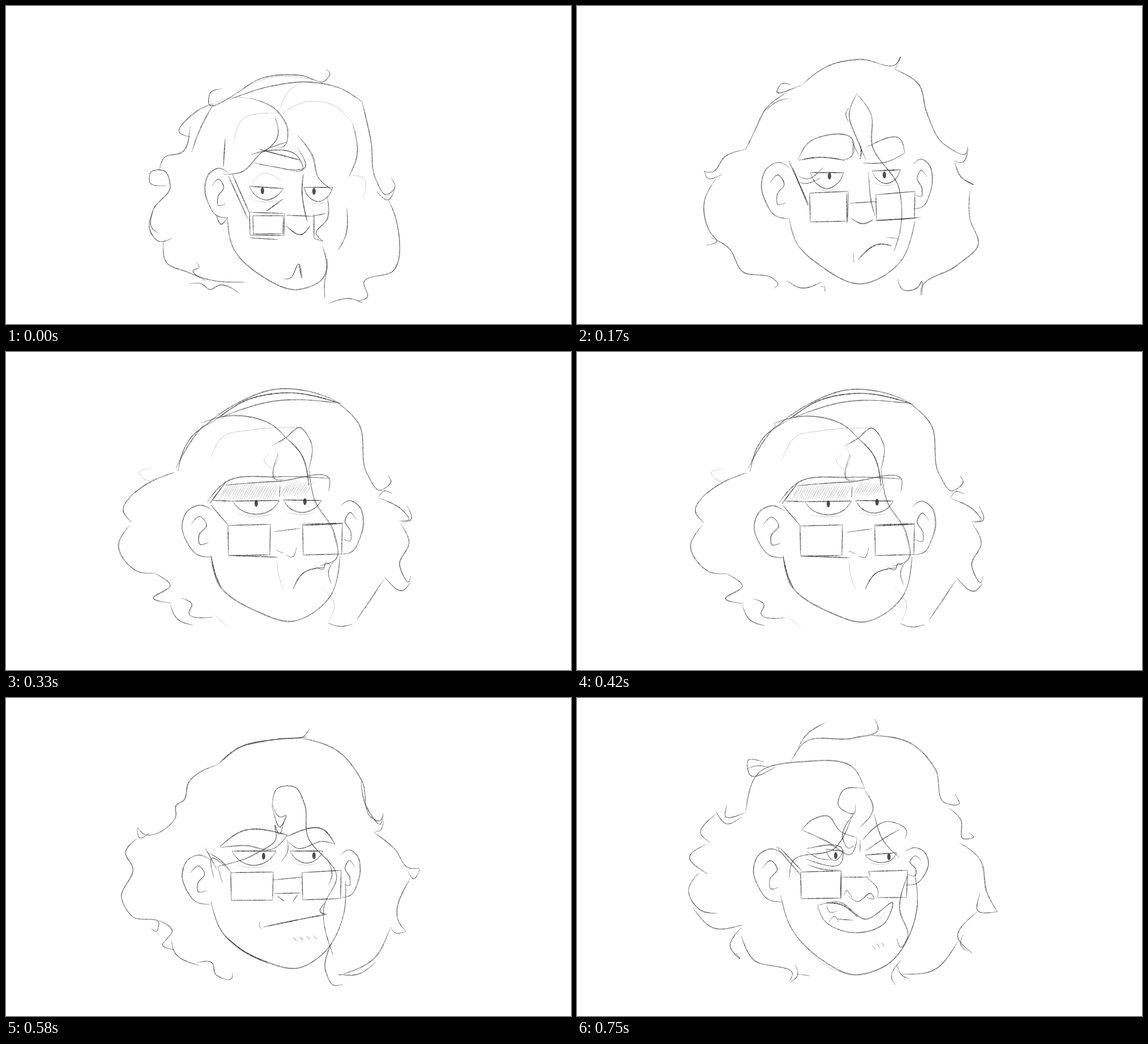
Write an HTML page with a canvas that moves like this. It is 998 by 561 pixels and loops after 870 ms.

```html
<!DOCTYPE html>
<html lang="en">
<head>
<meta charset="utf-8">
<title>Pencil head turn</title>
<style>
html, body { margin: 0; width: 100%; height: 100%; overflow: hidden; background: #fff; }
canvas { display: block; width: 998px; height: 561px; }
</style>
</head>
<body>
<canvas id="stage" width="998" height="561"></canvas>
<script>
const LOOP = 870, W = 998, H = 561;
let g, seed;

const rnd = () => (seed = (seed * 16807) % 2147483647) / 2147483647;

function pairs(v) {
  const p = [];
  for (let i = 0; i < v.length; i += 2) p.push([v[i], v[i + 1]]);
  return p;
}

// Smooth curve through a few points; tangents weighted by chord length.
function smooth(p) {
  const n = p.length - 1, out = [];
  const len = i => Math.hypot(p[i + 1][0] - p[i][0], p[i + 1][1] - p[i][1]) || 1;
  const dir = (i, j) => (p[i + 1][j] - p[i][j]) / len(i);
  const inner = (i, j) => (dir(i - 1, j) * len(i) + dir(i, j) * len(i - 1)) / (len(i - 1) + len(i));
  const tangent = (i, j) => n < 2 ? dir(0, j)
    : i === 0 ? 1.5 * dir(0, j) - inner(1, j) / 2
    : i === n ? 1.5 * dir(n - 1, j) - inner(n - 1, j) / 2 : inner(i, j);
  for (let i = 0; i < n; i++) {
    const d = len(i), steps = Math.max(2, Math.ceil(d / 2.5));
    for (let k = 0; k < steps; k++) {
      const t = k / steps, u = 1 - t;
      out.push([0, 1].map(j => u * u * (1 + 2 * t) * p[i][j] + t * t * (3 - 2 * t) * p[i + 1][j]
        + d * t * u * (u * tangent(i, j) - t * tangent(i + 1, j))));
    }
  }
  return out.concat([p[n]]);
}

function pencil(pts, width, alpha) {
  const last = pts.length - 1;
  for (let i = 0; i < last; i++) {
    const taper = Math.min(1, 0.45 + Math.min(i, last - i) * 0.09);
    g.globalAlpha = alpha * taper * (0.7 + 0.5 * rnd());
    g.lineWidth = width * (0.85 + 0.3 * rnd());
    g.beginPath();
    g.moveTo(...pts[i]);
    g.lineTo(...pts[i + 1]);
    g.stroke();
  }
}

// A loose second pass over part of a long stroke.
function retrace(pts) {
  if (pts.length < 25) return;
  const from = Math.floor(rnd() * pts.length * 0.4);
  const part = pts.slice(from, from + Math.floor(pts.length * 0.5));
  const sx = rnd() * 3 - 1.5;
  pencil(part.map(([x, y]) => [x + sx, y + 1]), 0.9, 0.35);
}

function line(...v) {
  const pts = smooth(pairs(v));
  pencil(pts, 1.15, 0.7);
  retrace(pts);
}
const faint = (...v) => pencil(smooth(pairs(v)), 0.9, 0.27);
const dark = (...v) => pencil(smooth(pairs(v)), 1.6, 0.82);

function edge(...v) {
  const p = pairs(v);
  for (let i = 1; i < p.length; i++) pencil(smooth([p[i - 1], p[i]]), 1.4, 0.76);
}

function lens(x, y, w, h, tilt) {
  edge(x, y, x + w, y - tilt, x + w - 1, y + h - tilt / 2, x + 1, y + h, x, y);
}

// x is the outer rim; a negative w mirrors the ear.
function ear(x, y, w, h) {
  const fit = (...v) => v.map((n, i) => i % 2 ? y + n * h : x + n * w);
  line(...fit(1, 0.1, 0.6, 0, 0.2, 0.1, 0, 0.42, 0.15, 0.7, 0.5, 0.95, 0.98, 1));
  line(...fit(0.3, 0.36, 0.58, 0.22, 0.8, 0.38, 0.55, 0.58, 0.58, 0.75, 0.86, 0.72));
}

function eye(x0, y0, x1, y1, depth, px, py) {
  const w = x1 - x0;
  dark(x0, y0, x1, y1);
  line(x0, y0, x0 + w * 0.17, y0 + depth * 0.65, x0 + w / 2, y0 + depth, x0 + w * 0.83, y0 + depth * 0.65, x1, y1);
  faint(x0 + w * 0.1, y0 + depth, x0 + w / 2, y0 + depth + 4, x0 + w * 0.85, y0 + depth);
  g.globalAlpha = 0.8;
  g.beginPath();
  g.ellipse(px, py, 3, 6, 0, 0, 2 * Math.PI);
  g.fill();
}

function hatch(x0, x1, top, bottom) {
  for (let x = x0; x < x1; x += 4) {
    pencil(smooth([[x + 7, top + 3 * rnd()], [x - 7, bottom - 4 * rnd()]]), 0.9, 0.4);
  }
}

function glance() {
  line(410, 153, 445, 130, 520, 122, 565, 131, 572, 119, 566, 112);
  line(395, 165, 470, 141, 535, 134, 590, 145, 629, 169);
  faint(409, 150, 480, 124, 540, 130);
  line(382, 146, 361, 153, 358, 171, 415, 149);
  line(430, 162, 480, 186, 498, 220, 490, 248, 480, 250);
  faint(366, 172, 400, 161, 430, 163);
  line(367, 172, 336, 186, 307, 224, 325, 231);
  line(328, 258, 345, 212, 366, 174);
  line(325, 212, 312, 257, 279, 268, 271, 289);
  line(284, 317, 254, 311, 256, 293, 280, 291, 290, 318, 259, 362, 258, 392, 268, 400);
  line(259, 362, 254, 395, 270, 415, 293, 410);
  line(278, 416, 283, 452, 320, 469, 360, 483, 422, 487);
  line(336, 451, 341, 461, 331, 466, 352, 484);
  line(325, 490, 345, 490, 360, 500, 378, 492, 412, 507);
  line(629, 169, 645, 240, 653, 305, 672, 333, 687, 320, 680, 303);
  line(687, 322, 675, 342, 655, 328);
  line(676, 342, 691, 385, 684, 467, 632, 488, 638, 514, 622, 520);
  line(570, 525, 608, 516, 630, 524);
  line(559, 423, 567, 465, 563, 485, 563, 515);
  faint(487, 190, 530, 169, 580, 176, 612, 207);
  line(612, 207, 620, 262, 606, 301);
  faint(483, 185, 505, 145, 525, 135);
  faint(605, 298, 633, 305, 630, 340);
  line(602, 355, 598, 410, 587, 430);
  line(515, 228, 542, 265, 552, 303, 577, 325);
  line(567, 335, 568, 375, 548, 402, 560, 415);
  faint(402, 245, 415, 203, 480, 189);
  line(384, 297, 415, 293, 455, 256, 497, 240);
  dark(387, 235, 384, 283);
  line(475, 195, 480, 230, 455, 258);
  ear(351, 286, 42, 88);
  dark(372, 370, 380, 385, 390, 375);
  line(391, 372, 402, 428, 450, 475, 515, 500, 560, 480, 568, 445);
  line(488, 481, 500, 481, 517, 455, 523, 480);
  dark(517, 455, 522, 480);
  dark(525, 297, 523, 325, 532, 380);
  dark(495, 388, 522, 403, 537, 388);
  dark(490, 340, 460, 362);
  line(433, 262, 455, 256, 515, 265, 525, 287, 475, 284, 440, 277);
  dark(448, 253, 520, 272);
  line(515, 250, 528, 285, 500, 288);
  eye(430, 318, 490, 322, 24, 453, 326);
  eye(526, 320, 577, 320, 25, 544, 327);
  faint(433, 315, 455, 295, 488, 310);
  lens(430, 364, 62, 40, -2);
  lens(436, 370, 54, 32, 0);
  edge(495, 369, 540, 371, 565, 366);
  edge(544, 367, 544, 410, 560, 415);
  edge(430, 409, 480, 412);
  edge(400, 297, 430, 365);
  edge(393, 300, 427, 375);
}

function frown() {
  line(413, 147, 455, 119, 510, 110, 573, 99);
  edge(573, 99, 551, 112);
  line(551, 112, 600, 138, 628, 182, 655, 262, 675, 301, 687, 290);
  line(414, 148, 375, 152, 341, 186, 318, 225, 307, 218);
  line(318, 225, 306, 253, 262, 273, 249, 310, 240, 323, 273, 306);
  line(246, 320, 258, 320, 268, 332, 277, 332);
  line(270, 328, 243, 378, 258, 408, 270, 412, 290, 463, 322, 476);
  line(307, 472, 351, 471, 360, 480, 358, 493);
  line(357, 484, 390, 489, 418, 484, 438, 495);
  line(662, 303, 685, 335, 706, 420, 695, 452, 630, 481);
  line(575, 440, 566, 500, 590, 512, 622, 502);
  edge(612, 508, 621, 512, 622, 496);
  line(433, 155, 480, 176, 502, 193);
  line(433, 155, 455, 170, 483, 190);
  faint(490, 160, 505, 165, 515, 178);
  line(482, 188, 486, 235, 450, 285, 400, 305, 396, 330);
  line(484, 188, 500, 230, 550, 302, 575, 325, 572, 370, 553, 410, 563, 415);
  line(563, 405, 564, 425, 576, 470);
  ear(342, 282, 42, 96);
  ear(632, 285, -34, 74);
  line(383, 378, 398, 425, 440, 468, 495, 495, 545, 483, 583, 438, 600, 350, 597, 325);
  dark(485, 471, 515, 447, 545, 450);
  edge(484, 459, 486, 474, 493, 470);
  line(519, 252, 521, 320, 528, 365);
  dark(520, 295, 533, 360);
  line(488, 384, 515, 394, 535, 382);
  dark(400, 281, 437, 250, 505, 248);
  line(505, 248, 500, 280, 445, 273, 400, 281);
  line(518, 257, 565, 244, 578, 268);
  line(578, 268, 535, 281, 520, 280);
  line(565, 241, 580, 258, 582, 270);
  eye(418, 307, 482, 308, 26, 450, 315);
  eye(525, 306, 574, 304, 22, 544, 314);
  lens(422, 348, 67, 47, -2);
  edge(421, 394, 497, 395);
  edge(490, 362, 533, 360);
  edge(490, 380, 533, 381);
  edge(585, 349, 534, 353, 538, 402, 586, 400);
  edge(421, 375, 380, 278, 388, 280, 423, 350);
}

function stern() {
  line(398, 138, 450, 103, 500, 94, 566, 100, 571, 90, 562, 112);
  line(398, 139, 353, 150, 362, 137, 378, 139);
  line(562, 112, 605, 140, 617, 185, 650, 245, 688, 259, 690, 249);
  line(666, 273, 680, 276, 691, 252);
  line(371, 152, 333, 182, 313, 222, 298, 253);
  line(374, 163, 355, 168, 335, 183);
  line(298, 253, 262, 265, 238, 293, 224, 292);
  line(225, 290, 230, 303, 256, 297);
  line(245, 305, 225, 345, 236, 400, 247, 415, 229, 422);
  line(236, 408, 268, 427, 292, 468, 348, 482, 355, 490, 348, 498);
  line(370, 484, 395, 497, 432, 487);
  edge(430, 495, 438, 495, 438, 504);
  line(667, 275, 680, 303, 700, 315, 685, 308);
  line(694, 325, 694, 375, 709, 420, 670, 458, 608, 500, 607, 510);
  line(566, 480, 575, 500, 603, 495, 608, 486, 609, 511);
  line(494, 155, 481, 190, 495, 235, 510, 270);
  line(494, 155, 519, 190, 521, 245, 568, 320, 570, 400, 560, 432);
  line(480, 180, 475, 190, 480, 205);
  line(490, 240, 485, 265, 470, 272);
  dark(498, 240, 502, 255, 500, 270);
  line(486, 240, 497, 262);
  ear(326, 276, 50, 99);
  ear(628, 270, -34, 88);
  line(375, 375, 388, 418, 430, 458, 500, 490, 567, 456, 597, 380);
  dark(497, 447, 535, 420, 556, 423);
  line(488, 435, 489, 452);
  line(546, 408, 565, 410);
  line(515, 293, 520, 345, 526, 370);
  dark(485, 375, 506, 384, 523, 377);
  line(390, 272, 408, 242, 487, 237, 486, 262);
  dark(392, 272, 430, 267, 472, 272);
  line(510, 250, 572, 236, 579, 260);
  line(505, 277, 550, 274, 578, 260);
  eye(412, 294, 471, 294, 28, 446, 300);
  eye(521, 291, 571, 289, 22, 543, 298);
  line(390, 300, 405, 305, 434, 285);
  line(388, 310, 405, 313, 430, 303);
  lens(411, 330, 68, 51, 3);
  edge(476, 330, 477, 383);
  edge(482, 348, 528, 345);
  lens(528, 333, 69, 45, 6);
  edge(527, 379, 607, 373);
  edge(374, 273, 409, 350);
  edge(381, 285, 408, 352);
}

function glower() {
  dark(370, 120, 425, 85, 495, 72, 592, 91);
  line(345, 135, 400, 95, 480, 65, 545, 72, 580, 85);
  line(380, 115, 470, 87, 588, 90);
  line(580, 85, 622, 125, 638, 215, 660, 244, 680, 227, 675, 218);
  line(657, 258, 668, 245, 682, 250);
  line(370, 120, 325, 153, 315, 170, 304, 210);
  line(300, 205, 325, 160, 350, 128);
  line(345, 125, 400, 112, 475, 132, 495, 152);
  line(298, 212, 245, 235, 218, 256);
  faint(258, 205, 235, 212, 250, 227, 265, 222);
  line(225, 250, 207, 280, 222, 300);
  line(218, 306, 199, 340, 235, 388, 262, 390);
  line(262, 390, 290, 412, 260, 434, 292, 443);
  line(290, 445, 302, 470, 330, 482);
  line(309, 434, 328, 445, 323, 460, 365, 468);
  faint(368, 463, 393, 486);
  line(660, 258, 704, 283, 712, 295, 695, 298);
  line(708, 271, 715, 296, 700, 300);
  line(697, 303, 712, 335, 695, 375, 712, 405, 715, 395);
  line(668, 396, 702, 420, 714, 407);
  line(667, 402, 620, 472);
  line(569, 478, 590, 484, 612, 480);
  line(470, 165, 493, 152, 518, 133, 539, 160, 535, 205);
  dark(495, 152, 520, 178, 535, 235);
  faint(470, 165, 480, 178, 470, 205, 456, 190, 465, 180);
  line(480, 180, 478, 225, 490, 225);
  line(535, 205, 545, 260, 580, 320, 583, 365, 555, 377);
  line(578, 370, 570, 385, 575, 410);
  faint(360, 190, 385, 148, 430, 138, 530, 133);
  faint(558, 415, 580, 445, 570, 475);
  ear(311, 270, 54, 92);
  ear(631, 262, -40, 95);
  line(362, 360, 375, 408, 445, 458, 505, 475, 572, 432, 590, 360);
  dark(362, 358, 372, 398, 380, 415);
  dark(507, 418, 525, 390, 560, 380);
  line(545, 377, 560, 383, 565, 372, 575, 378);
  line(478, 350, 490, 355);
  line(495, 358, 505, 362, 513, 345);
  faint(478, 365, 482, 395, 490, 418);
  line(355, 265, 387, 230, 480, 220, 573, 223);
  line(387, 235, 480, 228, 572, 228, 570, 245);
  dark(360, 267, 387, 231);
  hatch(384, 480, 231, 261);
  hatch(492, 538, 227, 254);
  edge(484, 235, 483, 255);
  dark(365, 262, 400, 263);
  eye(400, 263, 483, 262, 23, 442, 267);
  eye(490, 261, 557, 262, 22, 528, 264);
  lens(392, 306, 75, 53, 2);
  edge(394, 359, 480, 362);
  line(473, 317, 520, 311);
  lens(524, 306, 70, 52, 3);
  dark(523, 304, 595, 302);
  edge(362, 270, 392, 305);
}

function smirk() {
  line(373, 115, 415, 83, 480, 70, 527, 63, 534, 52);
  line(375, 112, 410, 85, 450, 75, 530, 67);
  line(516, 68, 585, 92, 627, 145, 645, 210, 657, 215, 665, 205);
  line(625, 145, 635, 190, 660, 220, 664, 202);
  line(648, 234, 658, 232, 665, 215);
  line(373, 115, 320, 148, 312, 178, 298, 188, 298, 205, 240, 237, 230, 226);
  line(230, 228, 234, 245, 250, 237);
  line(229, 246, 209, 270, 222, 298, 202, 350, 222, 384, 268, 395, 263, 410, 255, 405);
  line(268, 390, 292, 408, 275, 435, 295, 442);
  line(290, 425, 295, 445, 340, 470);
  line(335, 465, 362, 465, 368, 485, 397, 492, 398, 483);
  line(648, 235, 685, 265, 710, 298, 728, 298);
  line(708, 303, 718, 317, 729, 300);
  line(712, 316, 693, 395, 705, 410);
  line(677, 402, 685, 412, 704, 410);
  line(676, 405, 650, 455, 585, 488);
  line(583, 485, 620, 485, 650, 465);
  line(573, 430, 563, 480, 578, 505, 593, 503);
  line(468, 190, 478, 157, 508, 155, 525, 185, 530, 240, 582, 315, 560, 365, 575, 450);
  line(468, 185, 485, 208, 492, 205, 483, 225, 468, 190);
  line(490, 210, 480, 238, 473, 222, 475, 245, 440, 272, 372, 295);
  line(565, 280, 573, 315, 567, 328);
  dark(560, 360, 553, 375, 565, 380);
  ear(309, 275, 50, 87);
  ear(624, 266, -34, 84);
  line(360, 357, 378, 408, 455, 462, 515, 474, 560, 447, 593, 385, 598, 320);
  dark(385, 418, 420, 446, 460, 465);
  dark(453, 402, 525, 387, 562, 380);
  line(447, 392, 446, 402, 450, 405);
  for (let x = 505; x < 545; x += 12) line(x, 420 - (x - 505) / 12, x + 6, 426 - (x - 505) / 12);
  dark(477, 347, 490, 357);
  dark(505, 357, 513, 345);
  dark(376, 260, 415, 233, 495, 240);
  line(376, 262, 420, 258, 470, 264, 495, 240);
  dark(495, 242, 560, 231, 579, 256);
  line(497, 252, 510, 262, 560, 251, 579, 256);
  line(495, 248, 495, 270, 485, 285);
  eye(397, 268, 475, 268, 25, 453, 277);
  eye(500, 268, 558, 268, 21, 542, 276);
  lens(395, 306, 75, 49, 1);
  edge(470, 319, 521, 314);
  edge(472, 343, 518, 342);
  lens(521, 306, 69, 48, 4);
  line(352, 270, 378, 285, 397, 308);
  line(350, 262, 370, 300);
  line(365, 315, 362, 280, 385, 295);
  line(372, 295, 380, 323);
}

function smile() {
  line(378, 108, 420, 76, 510, 70, 526, 50);
  line(385, 100, 405, 78, 443, 58);
  line(505, 72, 550, 73, 600, 92, 632, 150, 668, 199);
  line(600, 90, 625, 128, 650, 183);
  line(490, 122, 440, 108, 380, 111, 315, 132, 307, 115, 315, 115);
  line(490, 122, 497, 155, 507, 158, 506, 150);
  line(330, 128, 302, 155, 301, 207, 248, 210, 247, 198);
  line(255, 195, 246, 208, 272, 213);
  line(252, 214, 219, 250, 225, 268, 211, 297, 216, 315);
  line(216, 315, 199, 317, 203, 355, 252, 381);
  line(220, 375, 235, 403, 280, 410, 292, 400);
  line(288, 402, 276, 445, 293, 422);
  line(290, 425, 300, 455, 345, 473, 356, 490);
  edge(357, 474, 370, 492, 376, 485, 381, 493, 385, 472);
  line(391, 470, 415, 492, 430, 486);
  line(658, 198, 673, 235, 672, 248, 686, 249);
  line(672, 250, 703, 270, 715, 335, 706, 372);
  line(708, 372, 702, 412, 677, 420, 682, 436);
  line(680, 418, 640, 460, 570, 480);
  line(560, 465, 554, 475, 563, 500);
  line(570, 470, 583, 494, 593, 491);
  line(497, 158, 463, 185, 490, 203, 486, 190);
  line(490, 203, 470, 248, 430, 270, 368, 305, 378, 318, 382, 308);
  dark(470, 235, 466, 245, 471, 260);
  line(497, 160, 525, 195, 530, 240, 574, 270, 575, 285);
  line(565, 268, 588, 335, 568, 390, 586, 440);
  ear(315, 268, 49, 92);
  ear(623, 262, -43, 72);
  line(363, 360, 382, 410, 455, 470, 520, 478, 560, 448, 603, 365, 598, 308);
  dark(365, 370, 382, 408, 440, 460);
  dark(540, 470, 560, 446, 575, 410);
  line(428, 377, 440, 372, 500, 380, 548, 375, 535, 395, 505, 402, 435, 390, 428, 377);
  line(505, 387, 550, 377);
  line(421, 382, 418, 376, 428, 371);
  line(558, 376, 565, 382, 563, 374);
  line(477, 348, 475, 355, 492, 352, 486, 349);
  line(505, 356, 519, 347, 518, 356);
  dark(383, 250, 405, 226, 420, 223, 465, 246);
  line(383, 250, 440, 258, 488, 275, 495, 250, 465, 246);
  dark(503, 250, 565, 226, 582, 250);
  line(503, 252, 510, 273, 582, 254);
  line(498, 250, 495, 272);
  eye(403, 272, 470, 270, 25, 452, 279);
  edge(403, 272, 404, 287);
  eye(505, 273, 564, 271, 21, 549, 277);
  lens(397, 310, 71, 46, 1);
  edge(468, 316, 518, 319);
  lens(519, 310, 64, 47, 3);
  edge(360, 268, 397, 310);
  edge(365, 278, 390, 312);
}

function grin() {
  line(378, 112, 400, 80, 490, 70, 532, 55, 526, 37);
  line(390, 90, 405, 65, 438, 44);
  line(520, 66, 590, 80, 633, 125, 650, 185, 675, 187, 668, 170);
  line(508, 160, 490, 125, 400, 112, 320, 133, 298, 200);
  line(350, 122, 305, 135, 302, 110, 330, 113);
  line(300, 125, 315, 120, 340, 122);
  line(298, 202, 262, 208, 265, 188);
  line(245, 200, 265, 222, 290, 210);
  line(245, 205, 219, 240, 235, 255);
  line(228, 258, 199, 280, 230, 310);
  line(215, 308, 197, 340, 220, 375, 247, 380);
  line(205, 370, 240, 405, 293, 400);
  line(290, 405, 271, 440, 288, 460, 281, 450);
  line(290, 420, 310, 460, 380, 490, 375, 500);
  line(386, 472, 390, 488, 376, 502);
  line(390, 487, 411, 490);
  line(657, 194, 678, 215, 682, 248, 701, 245, 693, 238);
  line(675, 255, 712, 285, 725, 345, 743, 378);
  line(712, 345, 708, 375, 742, 377);
  line(706, 378, 673, 422, 698, 450);
  line(682, 418, 678, 435, 690, 447);
  line(672, 430, 630, 480, 575, 487);
  line(572, 463, 556, 495, 562, 506);
  line(565, 470, 575, 490, 587, 495);
  line(508, 160, 470, 163, 462, 190, 490, 203, 492, 188);
  line(508, 162, 523, 195, 500, 228);
  line(490, 203, 470, 250, 480, 265, 490, 260);
  line(525, 205, 540, 250, 570, 282);
  line(487, 205, 455, 265, 380, 290, 375, 318);
  line(585, 310, 570, 370, 583, 425, 572, 440, 565, 425);
  ear(312, 266, 52, 94);
  ear(621, 264, -41, 66);
  line(360, 348, 378, 405, 430, 460, 490, 488, 545, 472, 600, 375, 597, 310);
  faint(400, 432, 450, 478, 480, 487);
  line(472, 348, 475, 340, 486, 352);
  line(512, 317, 532, 345, 530, 352);
  line(480, 350, 495, 359, 520, 345, 525, 354, 512, 352);
  line(425, 366, 462, 360, 510, 390, 558, 361, 545, 395, 490, 414, 435, 390, 425, 366);
  dark(440, 362, 465, 364, 495, 386);
  line(441, 366, 447, 378, 460, 375);
  line(445, 395, 455, 385, 462, 395);
  edge(460, 390, 488, 392);
  faint(528, 385, 535, 390, 542, 378);
  for (let x = 522; x < 540; x += 8) line(x, 436 - (x - 522) / 3, x + 5, 444 - (x - 522) / 3);
  line(397, 233, 415, 215, 443, 208, 465, 235, 495, 246);
  line(397, 233, 440, 252, 485, 275, 495, 247);
  line(505, 250, 550, 218, 582, 235, 580, 248);
  line(510, 270, 555, 240, 570, 232);
  line(500, 250, 500, 272);
  line(404, 266, 470, 270, 468, 288, 404, 284);
  line(406, 270, 425, 282, 450, 285);
  line(408, 294, 440, 303, 465, 303);
  eye(440, 267, 470, 270, 20, 457, 278);
  eye(509, 277, 565, 273, 13, 551, 280);
  lens(395, 307, 72, 47, 2);
  edge(466, 308, 466, 354);
  edge(468, 316, 515, 316);
  edge(518, 316, 515, 306, 584, 304, 582, 352, 532, 352);
  edge(352, 263, 360, 266, 397, 305);
  edge(355, 266, 395, 312);
}

// start time, pose, shift
const steps = [
  [0, glance, 0, 0], [80, frown, 0, 0], [170, stern, 0, 0], [250, stern, -9, -12], [330, glower, 0, 0],
  [420, glower, 2, 1], [500, smirk, 0, 0], [580, smirk, 2, 2], [670, smile, 0, 0], [750, grin, 0, 0]
];

function sheet([, pose, dx, dy]) {
  const c = document.createElement('canvas');
  c.width = W;
  c.height = H;
  g = c.getContext('2d');
  seed = 77;
  g.translate(dx, dy);
  g.strokeStyle = g.fillStyle = '#222';
  pose();
  return c;
}

const sheets = steps.map(sheet);
const ctx = document.getElementById('stage').getContext('2d');
const start = performance.now();

function draw() {
  const t = (performance.now() - start) % LOOP;
  const i = steps.filter(s => s[0] <= t).length - 1;
  ctx.fillStyle = '#fff';
  ctx.fillRect(0, 0, W, H);
  ctx.drawImage(sheets[Math.max(0, i)], 0, 0);
  requestAnimationFrame(draw);
}
draw();
</script>
</body>
</html>
```
